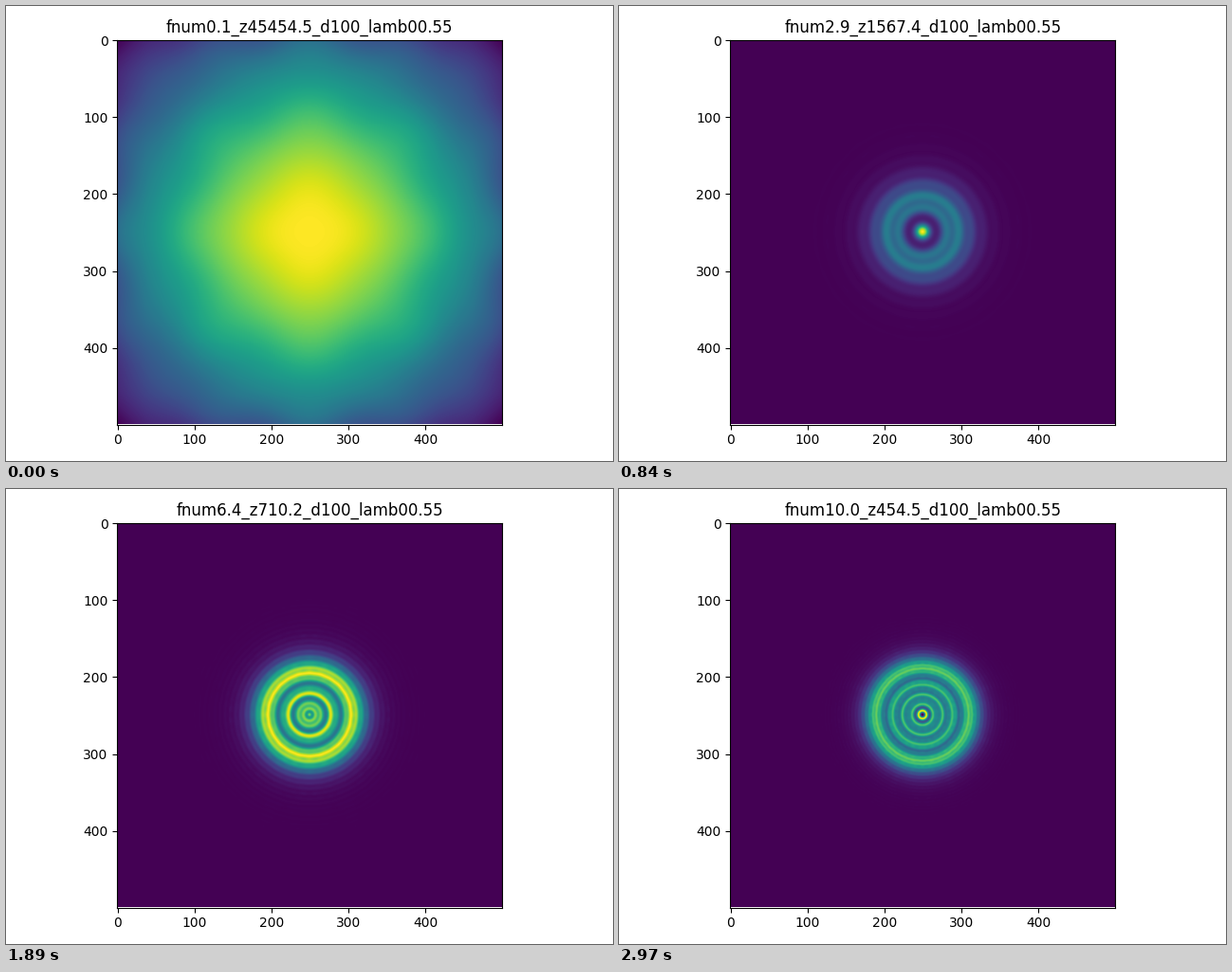
Write a matplotlib script that moves like this. It is 640 px wide and 480 px high and loops after 3 s.

```python
import numpy as np
import matplotlib.pyplot as plt
from matplotlib.animation import FuncAnimation

FRAMES, INTERVAL = 100, 30
WIDTH, HEIGHT, DPI = 640, 480, 100

# Lengths in micrometres
LAMB = 0.55
DIAM = 100
N = 500
PIXEL = 0.6
SPAN = N * PIXEL

# The field is even in x and y, so one quadrant and cosine sums are enough
x = (np.arange(N // 2) + 0.5) * PIXEL
freq = np.arange(N) / (2 * SPAN)
basis = np.cos(2 * np.pi * np.outer(x, freq))
weight = np.where(freq > 0, 2.0, 1.0)
hole = (x[:, None] ** 2 + x ** 2 <= (DIAM / 2) ** 2).astype(float)
spectrum = (basis.T @ hole @ basis) * np.outer(weight, weight)
kz = 2 * np.pi * np.sqrt(1 / LAMB ** 2 - freq[:, None] ** 2 - freq ** 2)


def intensity(z):
    """Band-limited angular spectrum propagation of the aperture."""
    limit = 1 / (LAMB * np.hypot(z / SPAN, 1))
    m = np.count_nonzero(freq <= limit)
    phase = z * kz[:m, :m]
    b, s = basis[:, :m], spectrum[:m, :m]
    re = b @ (s * np.cos(phase)) @ b.T
    im = b @ (s * np.sin(phase)) @ b.T
    quad = re ** 2 + im ** 2
    half = np.concatenate([quad[::-1], quad])
    return np.concatenate([half[:, ::-1], half], axis=1)


fig = plt.figure(figsize=(WIDTH / DPI, HEIGHT / DPI), dpi=DPI)
LEFT, BOTTOM, SIDE = 117.3, 38.5, 405.8
ax = fig.add_axes([LEFT / WIDTH, BOTTOM / HEIGHT, SIDE / WIDTH, SIDE / HEIGHT])
image = ax.imshow(np.zeros((N, N)), cmap="viridis")
title = ax.set_title("")


def update(i):
    fnum = (i + 1) / 10
    z = (DIAM / 2) ** 2 / (LAMB * fnum)
    data = intensity(z)
    image.set_data(data)
    image.set_clim(data.min(), data.max())
    title.set_text(f"fnum{fnum:.1f}_z{z:.1f}_d{DIAM}_lamb0{LAMB:.2f}")
    return image, title


anim = FuncAnimation(fig, update, frames=FRAMES, interval=INTERVAL,
                     repeat=True, repeat_delay=0, blit=False)
plt.show()
```
